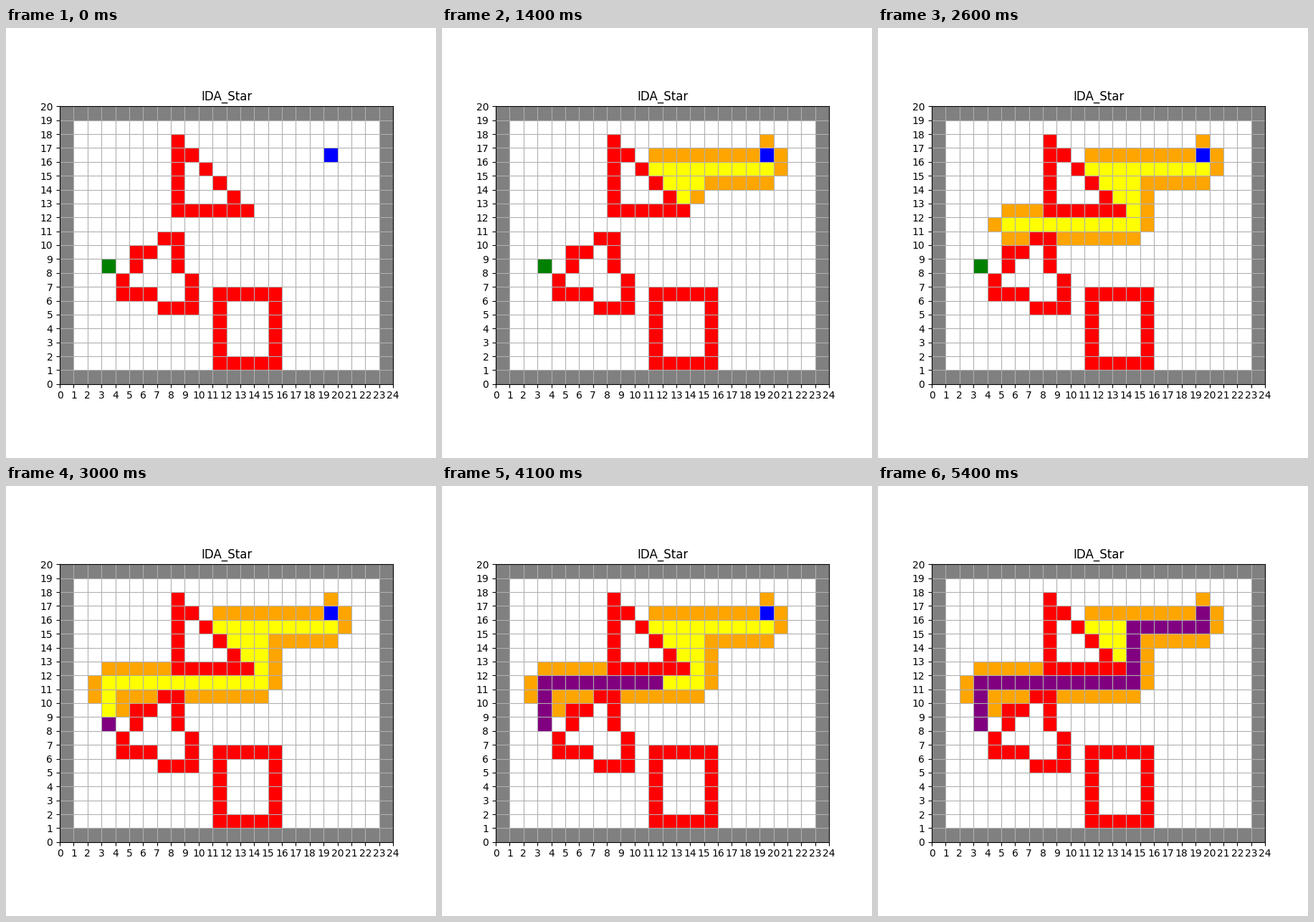
Recreate the animation shown at these times as a matplotlib script. Size 600 by 600 pixels, loop 5.5 s.

```python
import numpy as np
import matplotlib.pyplot as plt
from matplotlib.animation import FuncAnimation
from matplotlib.colors import ListedColormap

W, H = 24, 20
STEP_MS = 100
COLORS = ["white", "gray", "red", "blue", "green", "orange", "yellow", "purple"]
FREE, BORDER, WALL, START, GOAL, OPEN, CLOSED, PATH = range(len(COLORS))
start, goal = (19, 16), (3, 8)


def row(x0, x1, y):
    """Cells from x0 to x1 inclusive, in either direction."""
    d = 1 if x1 >= x0 else -1
    return [(x, y) for x in range(x0, x1 + d, d)]


def col(x, y0, y1):
    d = 1 if y1 >= y0 else -1
    return [(x, y) for y in range(y0, y1 + d, d)]


triangle = col(8, 12, 17) + row(9, 13, 12) + [(9 + i, 16 - i) for i in range(4)]
blob = (row(7, 8, 10) + row(5, 6, 9) + col(8, 8, 9) + [(5, 8)] + col(4, 6, 7)
        + row(5, 6, 6) + col(9, 5, 7) + row(7, 8, 5))
box = row(11, 15, 6) + row(11, 15, 1) + col(11, 2, 5) + col(15, 2, 5)

# Order in which the search expands cells, then the way back from the goal
expanded = ([start] + row(19, 11, 15) + [(12, 14), (13, 14), (13, 13)]
            + col(14, 14, 12) + row(14, 3, 11) + col(3, 10, 9))
way_back = (col(3, 8, 10) + row(3, 14, 11) + col(14, 12, 14)
            + row(14, 19, 15) + [start])


def empty_grid():
    grid = np.full((H, W), FREE)
    grid[[0, -1], :] = BORDER
    grid[:, [0, -1]] = BORDER
    for x, y in triangle + blob + box:
        grid[y, x] = WALL
    grid[start[::-1]] = START
    grid[goal[::-1]] = GOAL
    return grid


def expand(grid, cell):
    x, y = cell
    if cell != start:
        grid[y, x] = CLOSED
    for dx, dy in ((0, 1), (1, 0), (0, -1), (-1, 0)):
        near = (x + dx, y + dy)
        if near == goal:
            return
        if grid[near[::-1]] == FREE:
            grid[near[::-1]] = OPEN


def grid_at(step):
    grid = empty_grid()
    for cell in expanded[:step]:
        expand(grid, cell)
    # The goal is marked in the same step as the last expansion
    for x, y in way_back[:max(0, step - len(expanded) + 1)]:
        grid[y, x] = PATH
    return grid


fig, ax = plt.subplots(figsize=(6, 6), dpi=100)
ax.set_aspect("equal")
ax.set_title("IDA_Star")
mesh = ax.pcolormesh(np.arange(W + 1), np.arange(H + 1), empty_grid(),
                     cmap=ListedColormap(COLORS), vmin=-0.5, vmax=len(COLORS) - 0.5)
ax.set_xticks(range(W + 1))
ax.set_yticks(range(H + 1))
ax.set_xlim(0, W)
ax.set_ylim(0, H)
ax.grid(True)


def update(step):
    mesh.set_array(grid_at(step))
    return [mesh]


n_frames = len(expanded) + len(way_back)
anim = FuncAnimation(fig, update, frames=n_frames, interval=STEP_MS,
                     repeat=True, repeat_delay=0, blit=False)
plt.show()
```
